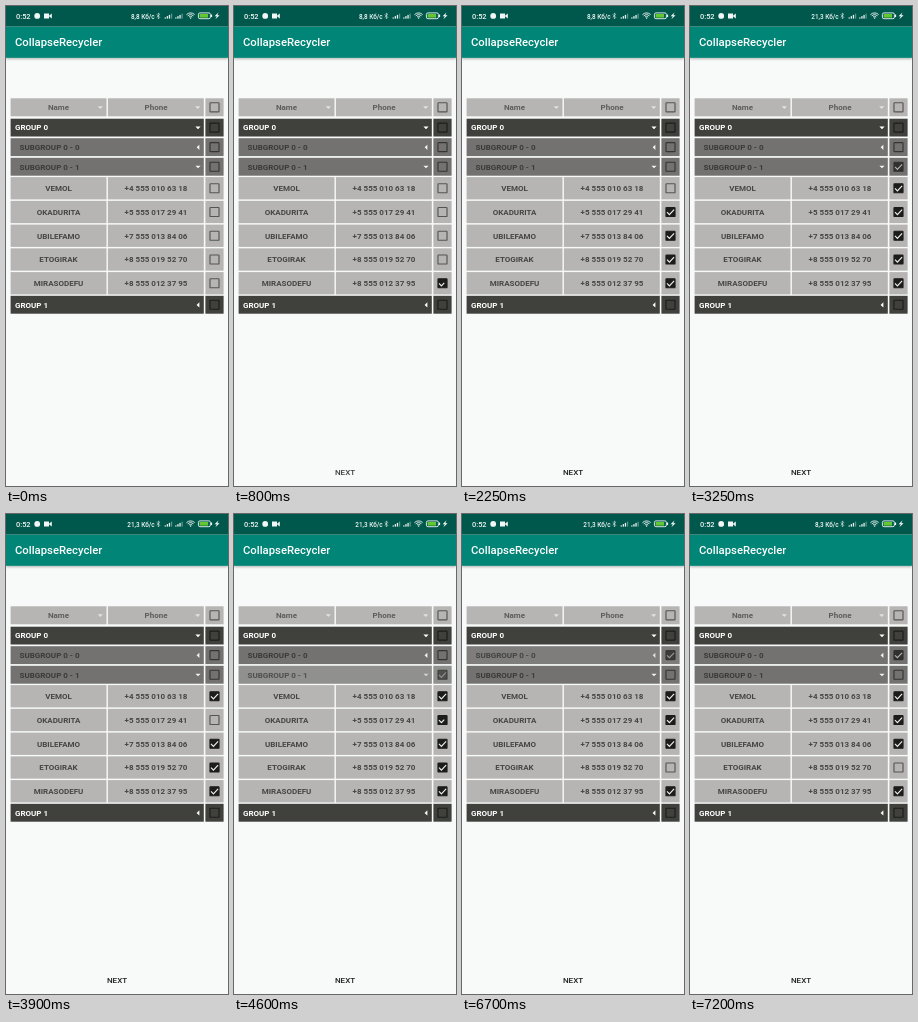
An HTML page with a canvas for the animation above (8000 ms loop, 222x480 px).

```html
<!DOCTYPE html>
<html lang="en">
<head>
<meta charset="utf-8">
<title>CollapseRecycler</title>
<style>
  html, body { margin: 0; width: 100%; height: 100%; overflow: hidden; background: #f7faf9; }
  canvas { display: block; width: 222px; height: 480px; }
</style>
</head>
<body>
<canvas id="stage"></canvas>
<script>
const W = 222, H = 480, LOOP = 8000, FADE = 250;
const BG = '#f7faf9';
const canvas = document.getElementById('stage');
const ctx = canvas.getContext('2d');
const dpr = window.devicePixelRatio || 1;
canvas.width = W * dpr;
canvas.height = H * dpr;

const STYLES = {
  header: { cell: '#b6b5b3', text: '#5d5d5b', line: '#555553', arrow: '#e2e2e0' },
  group: { cell: '#40403d', text: '#ffffff', line: '#1c1c1b', arrow: '#ffffff' },
  sub: { cell: '#737270', text: '#3a3a38', line: '#353533', arrow: '#f4f4f2', fill: '#30302e', tick: '#b0b0ad' },
  child: { cell: '#b6b5b3', text: '#464644', line: '#555553', fill: '#1c1c1b', tick: '#eeeeec' }
};

// Each toggle time flips the row's checkbox.
const CHILDREN = [
  { name: 'VEMOL', phone: '+4 555 010 63 18', toggles: [2450] },
  { name: 'OKADURITA', phone: '+5 555 017 29 41', toggles: [2000, 3550, 4450] },
  { name: 'UBILEFAMO', phone: '+7 555 013 84 06', toggles: [1550] },
  { name: 'ETOGIRAK', phone: '+8 555 019 52 70', toggles: [1100, 6050] },
  { name: 'MIRASODEFU', phone: '+8 555 012 37 95', toggles: [650] }
];
const SUB_TOGGLES = [2450, 3550, 4450, 6050];
const NEXT_AT = 650, SUB0_AT = 6650;

const clamp = v => Math.min(1, Math.max(0, v));
const ease = v => 0.5 - Math.cos(Math.PI * clamp(v)) / 2;

function box(x, y, w, h, color) {
  ctx.fillStyle = color;
  ctx.fillRect(x, y, w, h);
}

function label(str, x, y, size, color, align = 'left', weight = 700) {
  ctx.font = `${weight} ${size}px Roboto, sans-serif`;
  ctx.textAlign = align;
  ctx.textBaseline = 'alphabetic';
  ctx.fillStyle = color;
  ctx.fillText(str, x, y);
}

function poly(points, color) {
  ctx.fillStyle = color;
  ctx.beginPath();
  points.forEach(([x, y]) => ctx.lineTo(x, y));
  ctx.fill();
}

function stroke(points, color, width) {
  ctx.strokeStyle = color;
  ctx.lineWidth = width;
  ctx.beginPath();
  points.forEach(([x, y]) => ctx.lineTo(x, y));
  ctx.stroke();
}

function arrow(x, y, color, left) {
  poly(left
    ? [[x + 1.4, y - 2.6], [x + 1.4, y + 2.6], [x - 1.4, y]]
    : [[x - 2.6, y - 1.3], [x + 2.6, y - 1.3], [x, y + 1.4]], color);
}

// on: 0 is empty, 1 is ticked
function checkbox(y, style, on = 0) {
  const x = 208.5, s = 10.2, half = s / 2;
  ctx.strokeStyle = on > 0.3 ? style.fill : style.line;
  ctx.lineWidth = 1.15;
  ctx.beginPath();
  ctx.roundRect(x - half + 0.57, y - half + 0.57, s - 1.15, s - 1.15, 0.6);
  ctx.stroke();
  if (on <= 0) return;
  const hole = (s - 2) * (1 - clamp(on * 2));
  ctx.fillStyle = style.fill;
  ctx.beginPath();
  ctx.rect(x - half + 0.6, y - half + 0.6, s - 1.2, s - 1.2);
  ctx.rect(x - hole / 2, y - hole / 2, hole, hole);
  ctx.fill('evenodd');
  const p = clamp(on * 2 - 1);
  if (p <= 0) return;
  const a = clamp(p * 3), b = clamp(p * 1.5 - 0.5);
  const mid = [x - 3.5 + 2.4 * a, y + 0.2 + 2.4 * a];
  stroke([[x - 3.5, y + 0.2], mid, [mid[0] + 4.7 * b, mid[1] - 4.9 * b]], style.tick, 1.2);
}

function checkLevel(toggles, t) {
  const past = toggles.filter(at => t >= at);
  if (!past.length) return 0;
  const p = ease((t - past[past.length - 1] + 40) / FADE);
  return past.length % 2 ? p : 1 - p;
}

function wideRow(y, h, style, text, x, left, on) {
  box(4.6, y, 193.2, h, style.cell);
  box(199.4, y, 18.2, h, style.cell);
  label(text, x, y + h / 2 + 2.8, 8, style.text);
  arrow(192, y + h / 2 + 0.2, style.arrow, left);
  checkbox(y + h / 2, style, on);
}

function cells(y, h, style, a, b, on) {
  box(4.6, y, 95.9, h, style.cell);
  box(101.9, y, 95.9, h, style.cell);
  box(199.4, y, 18.2, h, style.cell);
  const base = y + h / 2 + 2.8;
  label(a, 52.5, base, 8, style.text, 'center');
  label(b, 150, base, 8, style.text, 'center');
  checkbox(y + h / 2, style, on);
}

// The rebound row fades in while the previous one fades out.
function fadeRow(t, start, before, after, draw) {
  const p = ease((t - start) / FADE);
  if (p < 1) {
    ctx.globalAlpha = 1 - p;
    draw(before);
  }
  ctx.globalAlpha = p;
  draw(after);
  ctx.globalAlpha = 1;
}

function signal(x, bars) {
  for (let i = 0; i < 4; i++) {
    const h = 1.2 + i * 1.25;
    box(x + i * 2.1, 12.6 - h, 1.3, h, i < bars ? '#e8f3f1' : '#5b958d');
  }
}

function statusBar(t) {
  box(0, 0, W, 20.5, '#00574b');
  const white = '#f0f7f6';
  label('0:52', 10, 12.8, 7.4, white, 'left', 500);
  ctx.fillStyle = white;
  ctx.beginPath();
  ctx.arc(31.2, 9.9, 2.9, 0, 7);
  ctx.fill();
  box(38, 7.5, 5, 5, white);
  poly([[43.2, 9.5], [45.8, 7.5], [45.8, 12.5], [43.2, 10.5]], white);

  const speed = t < 3250 ? '8,8' : t < 7200 ? '21,3' : '8,3';
  label(speed + ' Кб/с', 148.6, 12.6, 6.4, white, 'right', 500);
  stroke([[150.8, 8.4], [153.8, 11.4], [152.3, 12.9], [152.3, 7], [153.8, 8.4], [150.8, 11.4]], white, 0.6);
  signal(158.6, 3);
  signal(169.2, 3);

  ctx.strokeStyle = white;
  ctx.lineWidth = 0.9;
  for (const r of [2.2, 4, 5.7]) {
    ctx.beginPath();
    ctx.arc(184.6, 12.6, r, -Math.PI * 0.76, -Math.PI * 0.24);
    ctx.stroke();
  }
  box(184, 11.5, 1.2, 1.2, white);

  ctx.beginPath();
  ctx.roundRect(192.4, 6.9, 12, 5.8, 1.5);
  ctx.stroke();
  box(193.6, 8, 8.5, 3.6, '#62c832');
  box(205, 8.5, 1.1, 2.6, white);
  poly([[212.4, 6.6], [208.6, 10.3], [210.8, 10.3], [209.4, 13.2], [213.6, 9.3], [211.4, 9.3]], white);
}

function toolbar() {
  ctx.save();
  ctx.shadowColor = 'rgba(0,0,0,.28)';
  ctx.shadowBlur = 2.5 * dpr;
  ctx.shadowOffsetY = dpr;
  box(0, 20.5, W, 31.3, '#008577');
  ctx.restore();
  label('CollapseRecycler', 9, 40.1, 11.3, '#ffffff', 'left', 500);
}

function table(t) {
  const { header, group, sub, child } = STYLES;
  cells(92.3, 18, header, 'Name', 'Phone', 0);
  arrow(94.3, 101.6, header.arrow);
  arrow(191.7, 101.6, header.arrow);

  wideRow(112.7, 17.8, group, 'GROUP 0', 9, false, 0);

  const first = on => wideRow(132.2, 17.9, sub, 'SUBGROUP 0 - 0', 13.5, true, on);
  if (t < SUB0_AT) first(0);
  else fadeRow(t, SUB0_AT, 1, 1, first);

  const second = on => wideRow(151.8, 17.9, sub, 'SUBGROUP 0 - 1', 13.5, false, on);
  const past = SUB_TOGGLES.filter(at => t >= at);
  const on = past.length % 2;
  if (past.length) fadeRow(t, past[past.length - 1], 1 - on, on, second);
  else second(0);

  CHILDREN.forEach((c, i) =>
    cells(171.1 + i * 23.75, 22.3, child, c.name, c.phone, checkLevel(c.toggles, t)));

  wideRow(289.8, 17.9, group, 'GROUP 1', 9, true, 0);
}

function draw(t) {
  ctx.setTransform(dpr, 0, 0, dpr, 0, 0);
  box(0, 0, W, H, BG);
  toolbar();
  statusBar(t);
  table(t);
  const shown = ease((t - NEXT_AT) / 200);
  if (shown > 0) {
    ctx.globalAlpha = shown;
    label('NEXT', 111, 469.4, 8, '#1f1f1f', 'center', 500);
    ctx.globalAlpha = 1;
  }
}

const start = performance.now();
function tick() {
  draw((performance.now() - start) % LOOP);
  requestAnimationFrame(tick);
}
tick();
</script>
</body>
</html>
```
